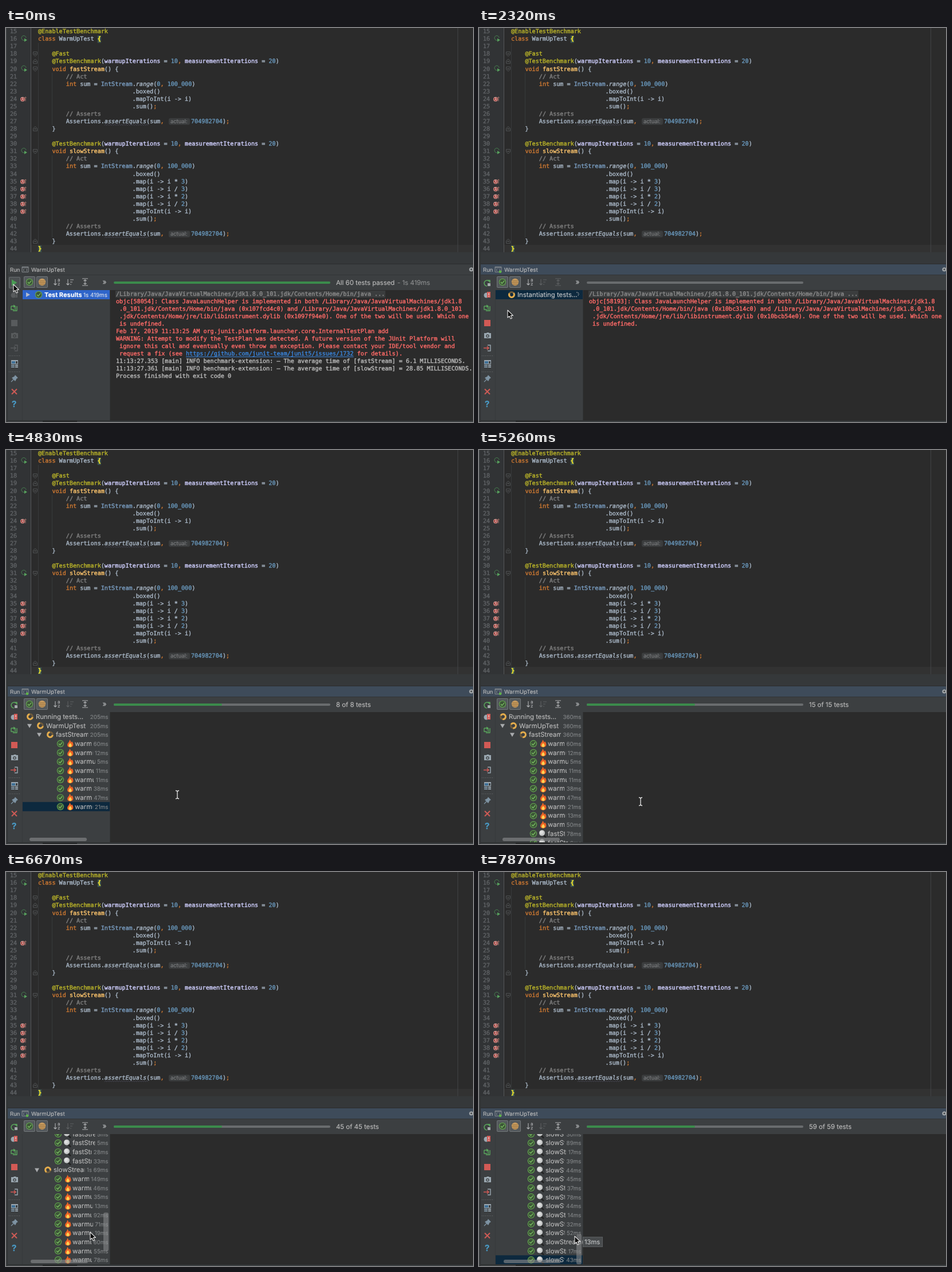
Recreate the animation shown at these times as an HTML page with a canvas. Size 815 by 687 pixels, loop 8000 ms.

```html
<!DOCTYPE html>
<html lang="en">
<head>
<meta charset="utf-8">
<title>Test runner</title>
<style>
html, body { margin: 0; width: 815px; height: 687px; overflow: hidden; background: #2b2b2b }
canvas { display: block }
</style>
</head>
<body>
<canvas id="stage" width="815" height="687"></canvas>
<script>
const g = document.getElementById('stage').getContext('2d');
g.textRendering = 'geometricPrecision';
g.lineJoin = 'round';
const MONO = '10.13px "DejaVu Sans Mono", monospace', CW = 6.098;
const sans = (size, weight = 400) => `${weight} ${size}px Inter, sans-serif`;
const LOOP = 8000;

const CODE = `@EnableTestBenchmark
class WarmUpTest {

    @Fast
    @TestBenchmark(warmupIterations = 10, measurementIterations = 20)
    void fastStream() {
        // Act
        int sum = IntStream.range(0, 100_000)
                           .boxed()
                           .mapToInt(i -> i)
                           .sum();
        // Asserts
        Assertions.assertEquals(sum, \t704982704);
    }

    @TestBenchmark(warmupIterations = 10, measurementIterations = 20)
    void slowStream() {
        // Act
        int sum = IntStream.range(0, 100_000)
                           .boxed()
                           .map(i -> i * 3)
                           .map(i -> i / 3)
                           .map(i -> i * 2)
                           .map(i -> i / 2)
                           .mapToInt(i -> i)
                           .sum();
        // Asserts
        Assertions.assertEquals(sum, \t704982704);
    }
}`.split('\n');

const TOKEN = /(\/\/.*|@\w+|\b(?:class|void|int)\b|\w+Iterations|(?:fast|slow)Stream|IntStream|range|assertEquals|\b\d[\d_]*\b|[,;{}\t])/;
const COLORS = [
  [/^\/\//, '#808080'], [/^@/, '#bbb529'], [/^(class|void|int|,|;)$/, '#cc7832'],
  [/Iterations$/, '#d0d0ff'], [/^(fast|slow)Stream$/, '#ffc66d'],
  [/^IntStream$/, '#7a9ec2'], [/^\d/, '#6897bb']
];

const consoleText = (pid, a, b) => `/Library/Java/JavaVirtualMachines/jdk1.8.0_101.jdk/Contents/Home/bin/java ...
objc[${pid}]: Class JavaLaunchHelper is implemented in both /Library/Java/JavaVirtualMachines/jdk1.8
 .0_101.jdk/Contents/Home/bin/java (${a}) and /Library/Java/JavaVirtualMachines/jdk1.8.0_101
 .jdk/Contents/Home/jre/lib/libinstrument.dylib (${b}). One of the two will be used. Which one
 is undefined.`.split('\n');
const OLD_LOG = consoleText(58054, '0x107fcd4c0', '0x1097f94e0').concat(`Feb 17, 2019 11:13:25 AM org.junit.platform.launcher.core.InternalTestPlan add
WARNING: Attempt to modify the TestPlan was detected. A future version of the JUnit Platform will
 ignore this call and eventually even throw an exception. Please contact your IDE/tool vendor and
 request a fix (see https://github.com/junit-team/junit5/issues/1732 for details).
11:13:27.353 [main] INFO benchmark-extension: – The average time of [fastStream] = 6.1 MILLISECONDS.
11:13:27.361 [main] INFO benchmark-extension: – The average time of [slowStream] = 28.85 MILLISECONDS.
Process finished with exit code 0`.split('\n'));
const NEW_LOG = consoleText(58193, '0x10bc314c0', '0x10bcb54e0');

const FAST = [60, 12, 5, 11, 11, 38, 47, 21, 13, 50, 78, 6, 3, 3, 2, 4, 6, 5, 7, 4, 5, 9, 6, 4, 5, 6, 5, 5, 28, 33];
const SLOW = [149, 46, 35, 13, 92, 71, 19, 60, 55, 78, 120, 98, 110, 93, 30, 89, 17, 39, 44, 45, 37, 78, 44, 14, 32, 52, 13, 17, 43];

const ticks = [0, 600];
for (const [from, to, n] of [[1000, 1720, 6], [2020, 3050, 8], [3200, 4240, 8], [4380, 5410, 8],
  [5550, 6530, 7], [6670, 7580, 7], [7730, 7870, 2]])
  for (let i = 0; i < n; i++) ticks.push(Math.round((from + (to - from) * i / (n - 1)) / 10) * 10);

const POINTER = [[0, 13, 447], [600, 20, 454], [1000, 20, 454], [1720, 50, 492], [3050, 50, 492],
  [3500, 250, 580], [3650, 312, 596], [4090, 316, 589], [4380, 316, 589], [5260, 282, 613],
  [5410, 282, 613], [5700, 165, 628], [6670, 147, 628], [7580, 163, 647], [7730, 167, 635]];
const COUNT = [[4380, 1], [5260, 15], [5700, 30], [6670, 45], [7580, 59]];
const SCROLL = [[5700, 0], [6670, 463], [7400, 761]];

function at(keys, t, k = 1) {
  const i = keys.findIndex(p => p[0] > t);
  if (i < 0) return keys[keys.length - 1][k];
  if (!i) return keys[0][k];
  const a = keys[i - 1], b = keys[i];
  return a[k] + (b[k] - a[k]) * (t - a[0]) / (b[0] - a[0]);
}
const sum = list => list.reduce((a, b) => a + b, 0);
const duration = ms => ms < 1000 ? ms + 'ms' : `${Math.floor(ms / 1000)}s ${ms % 1000}ms`;

function rect(x, y, w, h, color) { g.fillStyle = color; g.fillRect(x, y, w, h); }
function pill(x, y, w, h, color, r = 3) {
  g.fillStyle = color; g.beginPath(); g.roundRect(x, y, w, h, r); g.fill();
}
// A hairline outline gives the glyphs the heavier weight of smoothed screen text.
function text(s, x, y, color, font = MONO) {
  g.font = font; g.fillStyle = g.strokeStyle = color;
  g.lineWidth = font.includes('Mono') ? .4 : .15;
  g.fillText(s, x, y); g.strokeText(s, x, y);
}
function disc(x, y, r, color) {
  g.fillStyle = color; g.beginPath(); g.arc(x, y, r, 0, 7); g.fill();
}
function path(d, x, y, stroke, fill, width = 1.4) {
  g.save(); g.translate(x, y);
  const p = new Path2D(d);
  if (fill) { g.fillStyle = fill; g.fill(p); }
  if (stroke) { g.strokeStyle = stroke; g.lineWidth = width; g.stroke(p); }
  g.restore();
}

function check(x, y) {
  disc(x, y, 6.2, '#62a04f'); disc(x, y, 5, '#3c5537');
  path('M-3 0L-.7 2.4L3.2-2.4', x, y, '#79bd62');
}
function spinner(x, y, t) {
  const a = t / 800 * 2 * Math.PI;
  g.lineWidth = 3;
  for (const [from, to, c] of [[0, 6.3, '#6f5b3c'], [a, a + 4.4, '#e3ac4d']]) {
    g.strokeStyle = c; g.beginPath(); g.arc(x, y, 4.4, from, to); g.stroke();
  }
}
function flame(x, y) {
  path('M-1-7C1-5 1-3 2-2L3-4C7 1 6 6 0 6.5C-6 6-6 1-3-2C-2-3-1-5-1-7Z', x, y, null, '#ee6325');
  path('M0-1C3 2 4 5 0 6C-4 5-3 2 0-1Z', x, y, null, '#ffd454');
}
function lens(x, y) {
  path('M2 2L7 7', x, y, '#222', null, 2.4);
  disc(x, y - 1, 5, '#c6c8c8'); disc(x - 1, y - 2, 3, '#dedfdf');
}

function drawEditor() {
  rect(0, 0, 815, 412, '#2b2b2b');
  rect(0, 0, 43, 391, '#313335');
  rect(43, 378, 772, 13, '#323232');
  rect(43, 0, 1, 391, '#555759');
  rect(788, 0, 1, 391, '#414344');
  for (const [x, y, h] of [[56, 26, 352], [80, 78, 91], [80, 222, 143]]) rect(x, y, 1, h, '#373a3b');
  CODE.forEach((line, i) => {
    const y = 6 + i * 13.07, base = y + 3.2;
    text(15 + i, 7, base, '#606366');
    let x = 56;
    for (const s of line.split(TOKEN)) {
      if (s == '\t') {
        pill(284, y - 5.5, 37, 11.5, '#3b3d3e');
        text('actual:', 287, base, '#7d7f80', sans(9.4));
        x = 323;
        continue;
      }
      const brace = (s == '{' && i == 1) || (s == '}' && i == 29);
      const rule = COLORS.find(([re]) => re.test(s));
      if (brace) rect(x, y - 6, CW, 13, '#3b514d');
      const slant = /^(range|assertEquals)$/.test(s) ? 'italic ' : brace ? 'bold ' : '';
      text(s, x, base, brace ? '#ffef28' : rule ? rule[1] : '#a9b7c6', slant + MONO);
      if (s == 'assertEquals')
        for (let u = 0; u < 73; u += 4) path('M0 1L2-1L4 1', x + u, y + 6, '#50505f', null, .7);
      x += s.length * CW;
    }
    if ([1, 5, 16].includes(i)) {
      path('M3 2A4 4 0 1 1 4-1', 31, y - 1, '#478050', null, 1);
      path('M0 0L5 3L0 6Z', 32, y - 1, null, '#57a05d');
    }
    if (i == 9 || i > 19 && i < 25) {
      disc(29, y + .5, 4, '#c98f89'); disc(29, y + .5, 3, '#a0403c');
      path('M-1.5-2L0-2L1.5 2.5M0 0L-1.5 2.5', 29, y, '#ecd5d3', null, .9);
      path('M0 4V-3.5M-1.5-2L0-3.5L1.5-2', 34, y, '#b5766f', null, .9);
    }
    if ([3, 4, 5, 13, 16, 28].includes(i)) {
      const end = [4, 13, 28].includes(i);
      path(end ? 'M-3.5 3.5V-1L0-4L3.5-1V3.5Z' : 'M-3.5-3.5V1L0 4L3.5 1V-3.5Z', 51, y, '#505355', '#2b2b2b', 1);
      path('M-2 0H2', 51, y, '#606365', null, 1);
    }
  });
  rect(0, 391, 815, 20, '#35383a');
  rect(0, 411, 815, 1, '#2a2c2d');
}

function drawChrome(t, running, count) {
  rect(0, 412, 815, 275, '#3c3f41');
  rect(3, 412, 812, 19, t >= 1000 ? '#3e4b5a' : '#3c3f41');
  rect(3, 430, 812, 1, '#323537');
  text('Run', 7, 425, '#bbb', sans(9.6));
  text('WarmUpTest', 44, 425, '#bbb', sans(9.7));
  path('M-5-4.5H6V4.5H-5ZM-5-3H6M-1-1L-3 1L-1 3M2-1L4 1L2 3', 33, 421, '#878c90', null, 1);
  if (running) disc(37, 425, 2.3, '#5fb547');
  disc(812, 421, 3.6, '#a5a9ac'); disc(812, 421, 1.4, '#3c3f41');

  for (const x of [31, 53]) { pill(x, 433, 20, 20, '#72777a', 2); pill(x + 1, 434, 18, 18, '#53585b', 1); }
  check(41, 443);
  disc(63, 443, 6.2, '#c69a5e');
  path('M-5-2H5M-6 1H6M-4 4H4', 63, 443, '#94713f', null, 1);
  const on = '#afb1b3', off = '#5d6062', sortOff = running ? off : on;
  path('M0-5V5M-2.5 2.5L0 5L2.5 2.5', 86, 443, on, null, 1.1);
  text('a', 90, 442, on, sans(8)); text('z', 90, 449, on, sans(8));
  path('M-4-5V5M-6.5 2.5L-4 5L-1.5 2.5M0-4H6M0 0H4M0 4H2', 112, 443, sortOff, null, 1.1);
  path('M-5-6H5M-5 6H5M0-4V4M-2.5-2L0-4L2.5-2M-2.5 2L0 4L2.5 2', 138, 443, running && t < 4240 ? off : on, null, 1.1);
  text('»', 168.5, 446.5, on, sans(12));

  pill(188, 442, 378, 4, running ? '#696c6e' : '#3b8b4c', 2);
  if (count) pill(188, 442, 189, 4, '#3b8b4c', 2);
  if (!running) {
    text('All 60 tests passed', 576, 447.5, '#bbb', sans(11.4));
    text('- 1s 419ms', 683, 447.5, '#8a8c8d', sans(11.4));
  } else if (count) text(`${count} of ${count} tests`, 576, 447.5, '#bbb', sans(11.4));

  const dim = '#585b5d', red = running ? '#d25a55' : dim, gray = running ? '#9aa7b0' : dim;
  if (t < 1000) { pill(5, 434, 20, 20, '#686d70', 2); pill(6, 435, 18, 18, '#4c5052', 1); }
  if (running) {
    path('M4-3A5 5 0 1 0 0 5M1-5H5V-1', 14, 445, '#5aa65c', null, 1.6);
    rect(15, 445, 5, 5, '#a5a9ac');
  } else path('M-4-5.5L5.5 0L-4 5.5Z', 14, 444, null, t < 1140 ? '#499c54' : dim);
  disc(13, 466, 4.5, running ? '#9aa7b0' : dim);
  path('M0-5H6V5H0Z', 14, 465, null, red);
  path('M3-3V1M3 2.5V4', 14, 465, running ? '#ddd' : '#3c3f41', null, 1.2);
  path('M-5-3H2V4M-5-3V3H0M-2 5H5V-3M-1-5L2-3L-1-1', 14, 488, '#5aa65c');
  rect(9, 509, 11, 11, red);
  path('M-6-4H-2L-1-5H2L3-4H6V5H-6Z', 15, 536, null, gray);
  disc(15, 537, 2.8, '#3c3f41'); disc(15, 537, 1.5, gray);
  path('M0-5H5V5H0', 15, 558, gray);
  path('M-7 0H2M-1-3L2 0L-1 3', 15, 558, red);
  for (const y of [571, 599]) for (let x = 5; x < 25; x += 3) rect(x, y, 1, 1, '#6b6e70');
  rect(9, 579, 12, 7, '#9aa7b0'); rect(10, 581, 6, 4, '#3e6f96'); rect(17, 581, 3, 4, '#3c3f41');
  for (const y of [587, 590]) { rect(9, y, 6, 2, '#7e93a3'); rect(16, y, 5, 2, '#9aa7b0'); }
  path('M1-5L5-1L3 0L1 4L-4-1L0-3ZM-2 2L-6 6', 15, 611, '#7e93a3', '#7e93a3', 1.2);
  path('M-4.5-4.5L4.5 4.5M4.5-4.5L-4.5 4.5', 14.5, 634, '#cf5b56', null, 2);
  text('?', 10, 661, '#4a9bc7', sans(15, 700));
}

function drawConsole(t, running) {
  rect(182, 457, 633, 227, '#2b2b2b');
  if (t >= 4380) return;
  const log = !running ? OLD_LOG : t < 2170 ? NEW_LOG.slice(0, 1) : NEW_LOG;
  rect(191, 458, 471, 12, '#3b3d3e');
  log.forEach((line, i) => {
    const y = 467.1 + i * 13.03;
    let x = 192;
    for (const s of line.split(/(https\S+)/)) {
      const link = s.startsWith('https');
      text(s, x, y, link ? '#3a86de' : !i ? '#8c8c8c' : i < 9 ? '#ff6b68' : '#bbb');
      if (link) rect(x, y + 1.5, s.length * CW, 1, '#3a86de');
      x += s.length * CW;
    }
  });
}

function clipped(s, x, y, right, color, font) {
  g.save(); g.beginPath(); g.rect(0, 0, right, 687); g.clip();
  text(s, x, y, color, font);
  g.restore();
}

function treeRows(count) {
  const fast = FAST.slice(0, count), slow = SLOW.slice(0, Math.max(0, count - 30));
  const tests = (name, list) => list.map((ms, i) => ({
    ms, icon: i < 10 ? flame : lens, x: 95, label: i < 10 ? `warmup ${i + 1}` : `${name}() ${i - 9}`
  }));
  const total = sum(fast) + sum(slow);
  const rows = [
    { label: 'Running tests...', x: 42, ms: total, group: true },
    { label: 'WarmUpTest', x: 60, ms: total, group: true },
    { label: 'fastStream()', x: 77, ms: sum(fast), group: true, done: count > 30 },
    ...tests('fastStream', fast)
  ];
  if (slow.length) rows.push({ label: 'slowStream()', x: 77, ms: sum(slow), group: true }, ...tests('slowStream', slow));
  return rows;
}

function drawTree(t, running, count) {
  const font = sans(11.4), small = sans(9.8);
  g.save(); g.beginPath(); g.rect(29, 457, 152, 227); g.clip();
  if (!count) {
    rect(29, 457, 152, 16, running ? '#0d293e' : '#2f65ca');
    if (running) {
      spinner(57, 465, t);
      clipped(t < 3500 ? 'Instantiating tests...' : 'Running tests...', 67, 469, 176, '#c4c6c8', font);
      if (t < 3500) path('M0-4V-2M3-3L1.5-1.5M4 0H2M3 3L1.5 1.5', 171, 464, '#aaa', null, 1);
    } else {
      path('M-3-4L4 0L-3 4Z', 38, 465, null, '#b4bccb');
      check(57, 465);
      clipped('Test Results', 67, 469, 132, '#fff', sans(11, 700));
      text('1s 419ms', 135, 469, '#d7deeb', small);
    }
    g.restore();
    return;
  }
  const rows = treeRows(count), step = 15.68, height = rows.length * step;
  const scroll = Math.max(0, Math.min(at(SCROLL, t), height - 227)), shift = scroll ? 4 : 0;
  rows.forEach((row, i) => {
    const y = 465 + i * step - scroll, x = row.x - shift;
    if (y < 445 || y > 695) return;
    if (i == rows.length - 1) rect(29, y - 8, 152, 16, '#0d293e');
    if (row.group) {
      if (i) path('M-4-3H4L0 4Z', x - 19, y, null, '#a9abad');
      row.done ? check(x, y) : spinner(x, y, t);
    } else {
      check(x, y);
      row.icon(x + (row.icon == lens ? 15 : 17), y);
    }
    const hovered = t >= 7870 && i == 60, time = duration(row.ms);
    g.font = small;
    const left = 178.5 - g.measureText(time).width;
    clipped(row.label, x + (row.group ? 10 : 25), y + 4, hovered ? 181 : left - 3.5, '#bbb', font);
    if (!hovered) text(time, left, y + 4, '#818486', small);
  });
  pill(41 + shift / 2, 676, 100, 6, 'rgba(140,142,143,.6)');
  if (scroll) pill(170, 457 + scroll * 227 / height, 9, 227 * 227 / height, 'rgba(140,142,143,.55)');
  g.restore();
}

function drawPointer(t) {
  const x = Math.round(at(POINTER, t, 1)), y = Math.round(at(POINTER, t, 2));
  if (x > 182) path('M-3-7Q0-7 0-5Q0-7 3-7M0-5V5M-3 7Q0 7 0 5Q0 7 3 7', x, y, '#e8e8e8', null, 1.3);
  else path('M0 0V13L3 10.3L5.2 15L7.6 14L5.4 9.4H9.5Z', x, y, '#e6e6e6', '#080808', 1.1);
}

function draw(t) {
  const running = t >= 2020, count = t < 4380 ? 0 : Math.floor(at(COUNT, t) + .01);
  drawEditor();
  drawChrome(t, running, count);
  drawConsole(t, running);
  drawTree(t, running, count);
  rect(28, 457, 1, 227, '#36393b');
  rect(181, 457, 1, 227, '#323436');
  rect(0, 684, 815, 1, '#292b2c');
  rect(64, 685, 60, 2, '#27292a');
  rect(0, 0, 2, 687, '#3c3f41');
  rect(2, 0, 1, 687, '#2c2e2f');
  if (t >= 7870) {
    rect(181, 636, 35, 18, '#5a5d5f');
    rect(182, 637, 33, 16, '#484b4d');
    text('13ms', 184, 649, '#c4c6c8', sans(11.2));
  }
  drawPointer(t);
}

let shown = -1;
function loop() {
  const now = performance.now() % LOOP, t = ticks.filter(k => k <= now).pop();
  if (t !== shown) draw(shown = t);
  requestAnimationFrame(loop);
}
loop();
</script>
</body>
</html>
```
